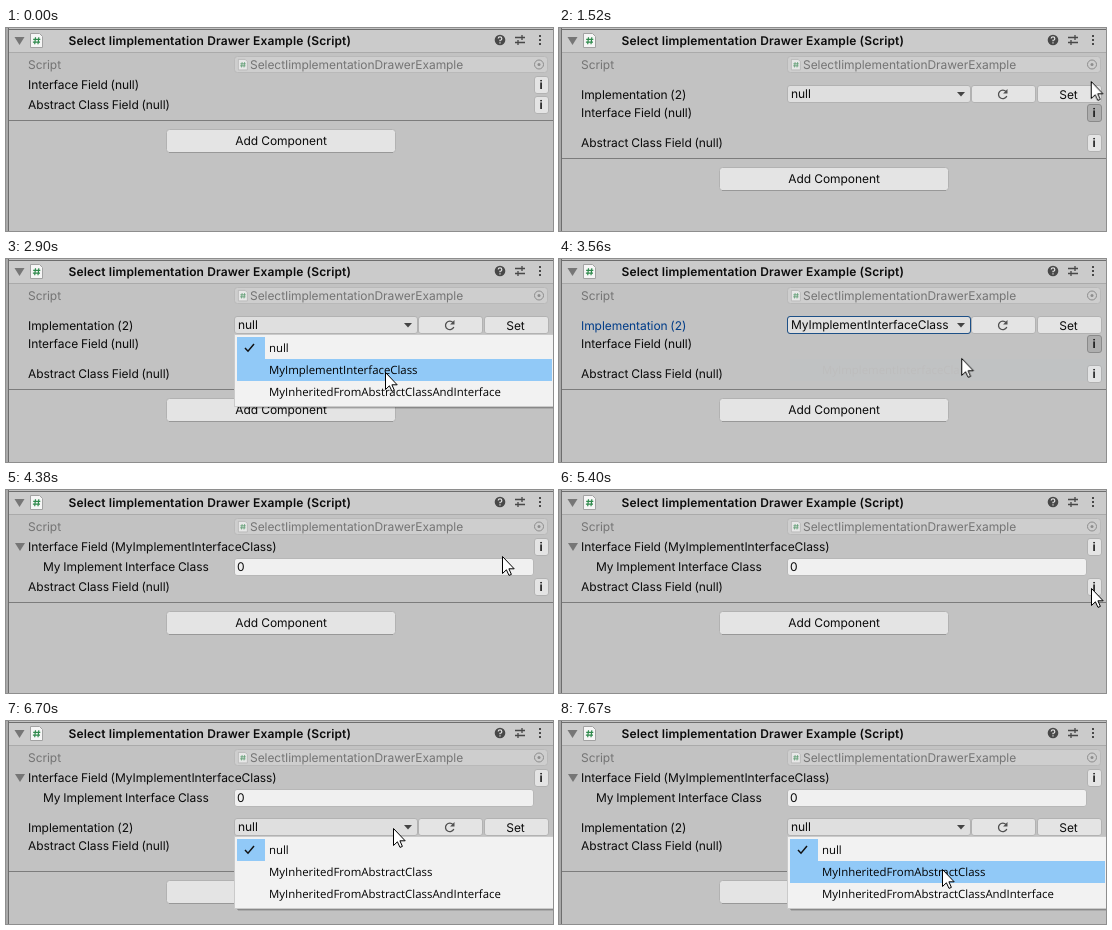
Write an HTML page that moves like this. It is 547 px wide and 203 px high and loops after 8 s.

```html
<!DOCTYPE html>
<html lang="en">
<head>
<meta charset="utf-8">
<title>Inspector drawer</title>
<style>
html, body { margin: 0; width: 100%; height: 100%; overflow: hidden; background: #c2c2c2; }
svg { display: block; width: 547px; height: 203px; }
text {
  font: 12px Inter, Roboto, sans-serif; letter-spacing: -.06px; word-spacing: -.55px;
  fill: #0b0b0b; text-rendering: geometricPrecision; white-space: pre;
}
.title { font-weight: 600; letter-spacing: .125px; word-spacing: 0; }
.mid { text-anchor: middle; word-spacing: 0; }
.bold { font-weight: 600; }
.dim { fill: #747474; }
.menu text { font: 11.4px "Open Sans", "Noto Sans", sans-serif; letter-spacing: 0; fill: #000; }
.btn { fill: var(--face, #e4e4e4); stroke: var(--edge, #b2b2b2); }
.on { --face: #aeaeae; --edge: #8a8a8a; }
.drop { fill: #dfdfdf; stroke: #b2b2b2; }
.row { fill: #91c9f7; }
.fold { fill: #767676; }
.focus .label { fill: #003c88; }
.focus .drop { stroke: #1d5087; }

/* Hard cuts */
.cut { animation: 8s step-end infinite; }
.start { animation-name: start; }
.first { animation-name: first; }
.idle { animation-name: idle; }
.focus { animation-name: focus; }
.filled { animation-name: filled; }
.second { animation-name: second; }
.menu1 { animation-name: menu1; }
.menu2 { animation-name: menu2; }
.hover1 { animation-name: hover1; }
.hover2 { animation-name: hover2; }
@keyframes start { 0% { opacity: 1 } 13.25%, 100% { opacity: 0 } }
@keyframes first { 0% { opacity: 0 } 13.25% { opacity: 1 } 50.625%, 100% { opacity: 0 } }
@keyframes idle { 0% { opacity: 1 } 40.75%, 100% { opacity: 0 } }
@keyframes focus { 0% { opacity: 0 } 40.75% { opacity: 1 } 50.625%, 100% { opacity: 0 } }
@keyframes filled { 0% { opacity: 0 } 50.625% { opacity: 1 } 68.5%, 100% { opacity: 0 } }
@keyframes second { 0% { opacity: 0 } 68.5%, 100% { opacity: 1 } }
@keyframes menu1 { 0% { opacity: 0 } 27.25% { opacity: 1 } 40.75%, 100% { opacity: 0 } }
@keyframes menu2 { 0% { opacity: 0 } 83.375%, 100% { opacity: 1 } }
@keyframes hover1 {
  0% { opacity: 0 } 32.2% { opacity: 1; transform: none }
  34.6%, 100% { opacity: 1; transform: translateY(22px) }
}
@keyframes hover2 {
  0% { opacity: 0 } 93.7% { opacity: 1; transform: none }
  95.25%, 100% { opacity: 1; transform: translateY(22px) }
}

/* The chosen row lingers and fades */
.ghost { animation: ghost 8s linear infinite; }
@keyframes ghost { 0%, 40.74% { opacity: 0 } 40.75% { opacity: 1 } 44.6%, 100% { opacity: 0 } }

.cursor { animation: move 8s linear infinite; }
@keyframes move {
  0%, 1.49% { transform: translate(570px, 156px) }
  1.5% { transform: translate(506px, 156px) }
  2.1% { transform: translate(481px, 140px) }
  3.25% { transform: translate(488px, 108px) }
  4.4% { transform: translate(510px, 74px) }
  5.625%, 10.37% { transform: translate(523px, 54px) }
  10.375%, 11.37% { transform: translate(529px, 41px) }
  11.375%, 19% { transform: translate(533px, 53px) }
  21.25% { transform: translate(486px, 61px) }
  23.75% { transform: translate(410px, 67px) }
  26.25%, 30.5% { transform: translate(366px, 66px) }
  31.75% { transform: translate(361px, 74px) }
  34.375% { transform: translate(372px, 98px) }
  36.25%, 41% { transform: translate(380px, 113px) }
  44.5% { transform: translate(403px, 99px) }
  47.5% { transform: translate(462px, 80px) }
  50.25% { transform: translate(499px, 67px) }
  54.75%, 61.75% { transform: translate(497px, 66px) }
  62.4% { transform: translate(503px, 61px) }
  65% { transform: translate(530px, 90px) }
  66.5%, 76.25% { transform: translate(533px, 98px) }
  76.75% { transform: translate(521px, 103px) }
  81.25% { transform: translate(420px, 111px) }
  83.75%, 88.24% { transform: translate(388px, 107px) }
  88.25%, 93% { transform: translate(388px, 108px) }
  94.5% { transform: translate(386px, 130px) }
  95.875%, 100% { transform: translate(384px, 148px) }
}
</style>
</head>
<body>
<svg viewBox="0 0 547 203">
  <defs>
    <g id="info">
      <rect class="btn" x="528.5" y=".5" width="14" height="17" rx="2.5"/>
      <text class="mid bold" x="535" y="13">i</text>
    </g>
    <path id="fold" class="fold" d="M0 0H10L5 8z"/>
    <g id="script">
      <path d="M.5.5H9.5L12.5 3.5V14.5H.5z" fill="#f6f6f6" stroke="#a2a2a2"/>
      <path d="M5.5 4.2 4.7 11.2M8.8 4.2 8 11.2M3.2 6.4H10.3M2.9 9.1H10" fill="none" stroke="#2f8a4c" stroke-width="1.2"/>
    </g>
    <!-- Separator and the button below it -->
    <g id="foot">
      <path d="M3 .5H547" stroke="#7c7c7c"/>
      <rect class="btn" x="160.5" y="9.5" width="229" height="23" rx="3"/>
      <path d="M163 32.5H387" stroke="#989898"/>
      <text class="mid" x="275" y="25">Add Component</text>
    </g>
    <g id="drop">
      <rect class="drop" x="228.5" y=".5" width="183" height="17" rx="2.5"/>
      <path d="M398 7H406L402 11.5z" fill="#444"/>
    </g>
    <g id="actions">
      <rect class="btn" x="412.5" y=".5" width="64" height="17" rx="2.5"/>
      <path d="M447.1 6.6A4.3 4.3 0 1 0 447.8 11" fill="none" stroke="#505050" stroke-width="1.3"/>
      <path d="M448.5 4V8.6H444.1z" fill="#505050"/>
      <rect class="btn" x="478.5" y=".5" width="64" height="17" rx="2.5"/>
      <text class="mid" x="509.5" y="14">Set</text>
    </g>
    <g id="panel">
      <rect x="232" y="4" width="330" height="71" fill="#000" opacity=".12"/>
      <rect x="231" y="3" width="330" height="71" fill="#000" opacity=".2"/>
      <rect x="228.5" y=".5" width="321" height="72" fill="#f2f2f2" stroke="#cacaca"/>
      <rect class="row" x="231" y="3" width="28" height="22"/>
    </g>
    <path id="tick" d="M239 14 242 17.2 248 10" fill="none" stroke="#111" stroke-width="1.5"/>
    <rect id="hover" class="row" x="231" y="3" width="315" height="22"/>
    <g id="field">
      <use href="#fold" x="9" y="53"/>
      <text x="22" y="61">Interface Field (MyImplementInterfaceClass)</text>
      <use href="#info" y="48"/>
      <text x="37" y="81">My Implement Interface Class</text>
      <rect x="228.5" y="68.5" width="299" height="17" rx="2.5" fill="#f0f0f0" stroke="#b7b7b7"/>
      <text x="231" y="81">0</text>
    </g>
  </defs>

  <rect width="547" height="203" fill="#c2c2c2"/>
  <rect x="3" y="1" width="544" height="23" fill="#cbcbcb"/>
  <path d="M3 24.5H547" stroke="#aaa"/>
  <rect width="2" height="203" fill="#a9a9a9"/>
  <path d="M2 1.5H547M2.5 0V203" stroke="#6e6e6e"/>
  <use href="#fold" x="8.5" y="9"/>
  <use href="#script" x="24" y="5"/>
  <text class="title" x="62.5" y="17">Select Iimplementation Drawer Example (Script)</text>

  <circle cx="494" cy="12" r="5.3" fill="#484848"/>
  <path d="M492.2 10.6A1.8 1.8 0 1 1 494 12.4V13.2M494 14.2V15.4" fill="none" stroke="#e0e0e0" stroke-width="1.2"/>
  <path d="M509 9.5H519M509 14.5H519M516 7V12M512 12V17" stroke="#484848" stroke-width="1.3"/>
  <path d="M533 7h2v2h-2zM533 11h2v2h-2zM533 15h2v2h-2z" fill="#484848"/>

  <text class="dim" x="22" y="41">Script</text>
  <rect x="228.5" y="28.5" width="313" height="16" rx="3" fill="#cecece" stroke="#b9b9b9"/>
  <use href="#script" transform="translate(232 31) scale(.75)" opacity=".65"/>
  <text class="dim" x="244" y="41">SelectIimplementationDrawerExample</text>
  <circle cx="533" cy="36.5" r="4.5" fill="none" stroke="#8d8d8d"/>
  <circle cx="533" cy="36.5" r="1.5" fill="#8d8d8d"/>

  <g class="cut start">
    <text x="22" y="61">Interface Field (null)</text>
    <use href="#info" y="48"/>
    <text x="22" y="81">Abstract Class Field (null)</text>
    <use href="#info" y="68"/>
    <use href="#foot" y="92"/>
  </g>

  <g class="cut first">
    <g class="cut idle">
      <text x="22" y="71">Implementation (2)</text>
      <use href="#drop" y="57"/>
      <text x="232" y="70">null</text>
    </g>
    <!-- Inlined dropdown box, so the focus colour applies -->
    <g class="cut focus">
      <text class="label" x="22" y="71">Implementation (2)</text>
      <use href="#drop" y="57"/>
      <rect class="drop" x="228.5" y="57.5" width="183" height="17" rx="2.5" fill-opacity="0"/>
      <text x="232" y="70">MyImplementInterfaceClass</text>
    </g>
    <use href="#actions" y="57"/>
    <text x="22" y="89">Interface Field (null)</text>
    <use href="#info" class="on" y="76"/>
    <text x="22" y="119">Abstract Class Field (null)</text>
    <use href="#info" y="106"/>
    <use href="#foot" y="130"/>
  </g>

  <g class="cut filled">
    <use href="#field"/>
    <text x="22" y="101">Abstract Class Field (null)</text>
    <use href="#info" y="88"/>
    <use href="#foot" y="112"/>
  </g>

  <g class="cut second">
    <use href="#field"/>
    <text x="22" y="111">Implementation (2)</text>
    <use href="#drop" y="97"/>
    <text x="232" y="110">null</text>
    <use href="#actions" y="97"/>
    <text x="22" y="129">Abstract Class Field (null)</text>
    <use href="#info" class="on" y="116"/>
    <use href="#foot" y="150"/>
  </g>

  <g class="menu" transform="translate(0 75)">
    <g class="cut menu1">
      <use href="#panel"/>
      <g class="cut hover1"><use href="#hover"/></g>
      <use href="#tick"/>
      <text x="263" y="18">null</text>
      <text x="263" y="40">MyImplementInterfaceClass</text>
      <text x="263" y="62">MyInheritedFromAbstractClassAndInterface</text>
    </g>
    <g class="ghost">
      <use href="#hover" y="22"/>
      <text x="263" y="40">MyImplementInterfaceClass</text>
    </g>
  </g>

  <g class="menu" transform="translate(0 115)">
    <g class="cut menu2">
      <use href="#panel"/>
      <g class="cut hover2"><use href="#hover"/></g>
      <use href="#tick"/>
      <text x="263" y="18">null</text>
      <text x="263" y="40">MyInheritedFromAbstractClass</text>
      <text x="263" y="62">MyInheritedFromAbstractClassAndInterface</text>
    </g>
  </g>

  <path class="cursor" d="M-.5.5V17.5L3.4 13.8 6 19.4 8.4 18.4 5.9 12.8H11.2z" fill="#fff" stroke="#000"/>
</svg>
</body>
</html>
```
